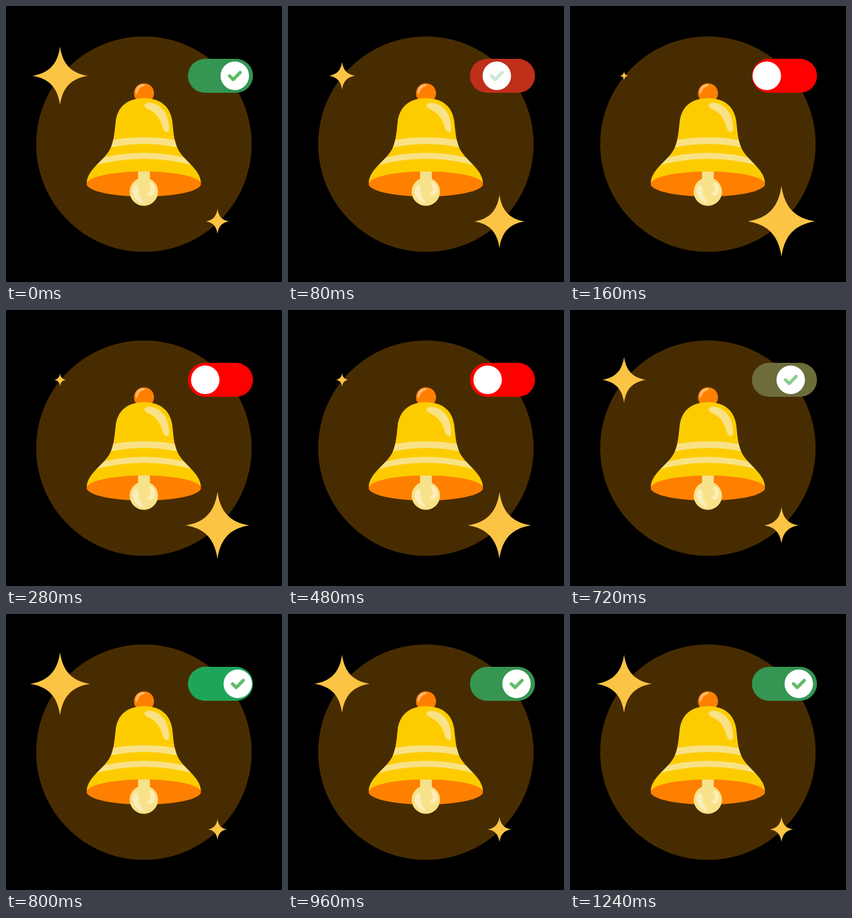
An HTML page that plays this animation: 512x512 px, repeating every 1.38 s.

```html
<!DOCTYPE html>
<html lang="en">
<head>
<meta charset="utf-8">
<title>Notification bell</title>
<style>
html, body { margin: 0; width: 100%; height: 100%; overflow: hidden; background: #000; }
svg { display: block; width: 100vw; height: 100vh; }
</style>
</head>
<body>
<svg viewBox="0 0 512 512">
  <defs>
    <path id="body" d="M256 171C225 171 207 187 203.5 214C201.500 231 201 245 195.500 260C186 286 151.500 300 149.700 328L256 342L361.700 328C360 300 326 286 316.500 260C311 245 310.500 231 308.500 214C305 187 287 171 256 171Z"/>
    <clipPath id="inBody"><use href="#body"/></clipPath>
    <path id="starShape" d="M0-1C.09-.4 .4-.09 1 0C.4 .09 .09 .4 0 1C-.09 .4-.4 .09-1 0C-.4-.09-.09-.4 0-1Z"/>
  </defs>

  <rect width="512" height="512"/>
  <circle cx="255.800" cy="256.300" r="199.800" fill="#482c01"/>

  <g id="bell">
    <circle cx="256" cy="162" r="18.600" fill="#ff8000"/>
    <path d="M240.500 161C239 153 246 144.500 254 145C258 145.500 259 147.500 256 149C249 150 246 154 244.500 160C243.500 163.500 241 164 240.500 161Z" fill="#ffb669"/>
    <use href="#body" fill="#fdcc00"/>
    <g clip-path="url(#inBody)" fill="#f9e285">
      <path d="M190 250Q256 237 322 250V263Q256 249 190 263Z"/>
      <path d="M160 286.500Q256 258 352 286.500V297Q256 270 160 297Z"/>
    </g>
    <path d="M259 181C270 176 290 184 298 203C303 216 304 230 301 233C298 236 293 233 291 226C287 211 280 199 265 192C257 189 255 184 259 181Z" fill="#f9e285"/>
    <ellipse cx="255.700" cy="330.200" rx="106" ry="23.300" fill="#ff8000"/>
    <path d="M245 307.100H266.800V326H245Z" fill="#f8e289"/>
    <circle cx="255.700" cy="344.500" r="26.300" fill="#f8e289"/>
    <g fill="#fbeebb">
      <path d="M239 333C235 336 233.500 344 237 352C241 361 250 367 254 365.500C256 363.500 252 360 249 355C245.500 349 246.500 342 245.500 336C244.500 332 241.500 331 239 333Z"/>
      <path d="M268 327C274 329 278 337 276 345C274 351 268 353 264 351C262 349 264 347 267 345C270 341 268.500 337 267 332C265 328 266 327 268 327Z"/>
    </g>
  </g>

  <g fill="#fbc444">
    <use id="starA" href="#starShape"/>
    <use id="starB" href="#starShape"/>
  </g>

  <rect id="track" x="337.500" y="98" width="120.700" height="63" rx="31.500"/>
  <g id="knob">
    <circle r="26.400" fill="#fff"/>
    <path id="check" d="M-9.700 .2L-2.900 6.800L10-6.200" fill="none" stroke="#5fbb66" stroke-width="6" stroke-linecap="round" stroke-linejoin="round"/>
  </g>
</svg>
<script>
const LOOP = 1380, STEP = 40, LAST = 1240;
const ON_AT = 636;
const SPEED = 1.25;
const OFF = [255, 0, 0], ON = [52, 150, 82];

const $ = id => document.getElementById(id);
const mix = (a, b, p) => a + (b - a) * p;
const clamp = v => Math.min(1, Math.max(0, v));

// Unit spring: stiffness 300, damping 20, mass 1
function spring(ms) {
  if (ms <= 0) return 0;
  const t = ms * SPEED / 1000, decay = 10, w = Math.sqrt(200);
  return 1 - Math.exp(-decay * t) * (Math.cos(w * t) + decay / w * Math.sin(w * t));
}

function placeStar(id, x, y, w, h) {
  $(id).setAttribute("transform", `translate(${x} ${y}) scale(${w} ${h})`);
}

function draw(ms) {
  const t = Math.min(LAST, Math.floor(ms / STEP) * STEP);
  const p = t < ON_AT ? 1 - spring(t) : spring(t - ON_AT);
  const rgb = OFF.map((c, i) => Math.round(clamp(mix(c, ON[i], p) / 255) * 255));

  $("track").setAttribute("fill", `rgb(${rgb})`);
  $("knob").setAttribute("transform", `translate(${mix(370.4, 424.4, p)} 129.5)`);
  $("check").setAttribute("opacity", clamp(p));
  placeStar("starA", 100.3, 129.5, mix(11.6, 51.4, p), mix(12.3, 54, p));
  placeStar("starB", 392.3, 399.5, mix(58.5, 21.5, p), mix(61.8, 23, p));
}

const start = performance.now();
function tick() {
  draw((performance.now() - start) % LOOP);
  requestAnimationFrame(tick);
}
tick();
</script>
</body>
</html>
```
